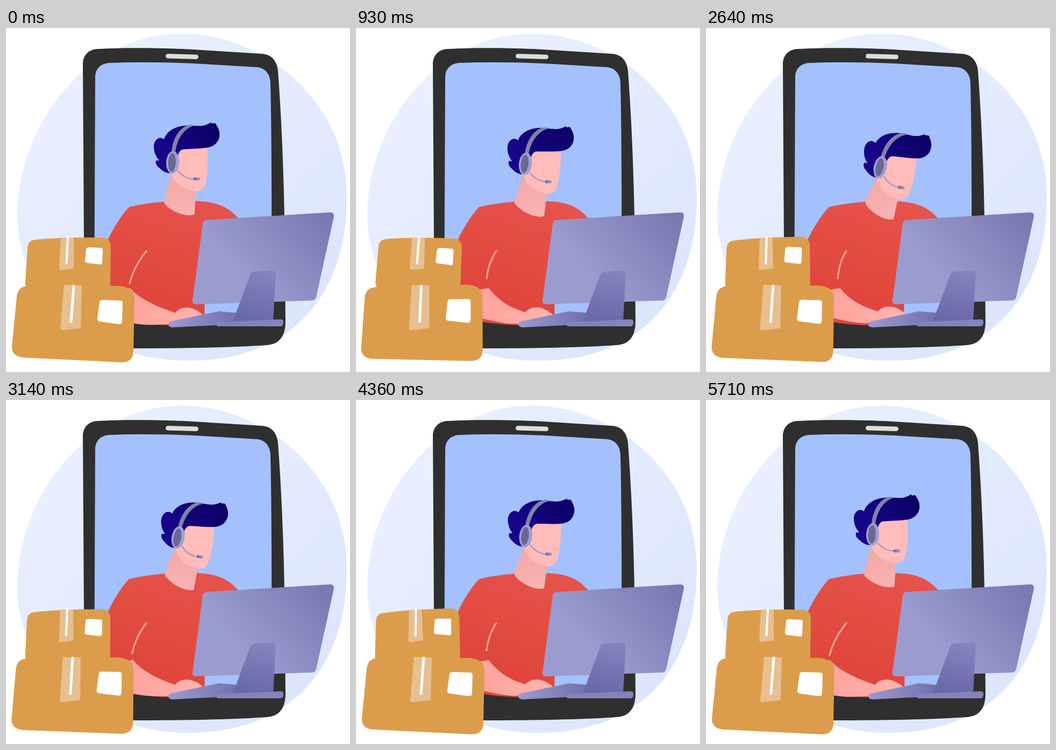
An HTML page for the animation above (5780 ms loop, 640 px wide and 640 px high).

```html
<!DOCTYPE html>
<html lang="en">
<head>
<meta charset="utf-8">
<title>Parcel support</title>
<style>
  html, body { margin: 0; width: 100%; height: 100%; overflow: hidden; background: #fff; }
  svg { display: block; width: 100%; height: 100%; }
</style>
</head>
<body>
<svg viewBox="0 0 640 640">
  <defs>
    <linearGradient id="sky" x1="0.2" y1="0.2" x2="0.9" y2="0.9">
      <stop offset="0" stop-color="#e9effe"/><stop offset="1" stop-color="#dce5fb"/>
    </linearGradient>
    <linearGradient id="shirt" x1="0.7" y1="0" x2="0.4" y2="0.8">
      <stop offset="0" stop-color="#e5534b"/><stop offset="1" stop-color="#e0463b"/>
    </linearGradient>
    <linearGradient id="skin">
      <stop offset="0" stop-color="#ff9f98"/><stop offset="1" stop-color="#ffb5b1"/>
    </linearGradient>
    <linearGradient id="throat" x1="0.3" y1="0" x2="0.5" y2="1">
      <stop offset="0" stop-color="#f4a6a4"/><stop offset="1" stop-color="#f7b3b3"/>
    </linearGradient>
    <linearGradient id="hair" x1="0" y1="0.6" x2="1" y2="0.3">
      <stop offset="0" stop-color="#18068c"/><stop offset="1" stop-color="#0c0066"/>
    </linearGradient>
    <linearGradient id="panel" x1="0.3" y1="0.6" x2="1" y2="0.2">
      <stop offset="0" stop-color="#9c9bd0"/><stop offset="1" stop-color="#7a79b2"/>
    </linearGradient>
    <linearGradient id="stand" x1="0.6" y1="0" x2="0.4" y2="1">
      <stop offset="0" stop-color="#8583be"/><stop offset="1" stop-color="#6a67a8"/>
    </linearGradient>
    <linearGradient id="keys">
      <stop offset="0" stop-color="#9b9bd0"/><stop offset="1" stop-color="#7170ac"/>
    </linearGradient>
    <linearGradient id="mic">
      <stop offset="0" stop-color="#6c6b94"/><stop offset="1" stop-color="#a0a0d0"/>
    </linearGradient>
  </defs>

  <path fill="url(#sky)" d="M325 10.500C420 9 515 60 570 130C615 186 634 250 634 315C634 500 528 619 340 619C164 619 21 503 21 350C21 180 150 12 325 10.500Z"/>

  <!-- phone -->
  <path fill="#2f2f2f" d="M143 68C143 50 154 40 170 39C220 36 290 37 340 39.500L476 48C494 49 504 61 506 80Q515 200 518 350L520 546C520 574 508 589 484 590C430 594 340 596 236 596L150 590L145 400Z"/>
  <path fill="#a4c1fe" d="M166 92C166 76 176 66 192 65Q260 62 350 66L468 73C484 75 492 88 492 104Q495 220 494 546L164 546Z"/>
  <rect x="297" y="48.7" width="61" height="8.6" rx="4.3" fill="#dddddb" transform="rotate(1.6 327 53)"/>

  <!-- person -->
  <g id="body">
    <path fill="url(#shirt)" d="M229 333C255 327 275 325 295 323L352 322C390 323 413 331 434 356L440 380L371 400L369 552L305 553C280 552 250 550 225 545L180 543L178 420Q184 404 190 393C200 372 213 350 229 333Z"/>
  </g>
  <path id="crease" fill="none" stroke="#fca59c" stroke-width="3" stroke-linecap="round"/>
  <path id="neck" fill="url(#throat)" d="M309 268L294 321Q293 327 301 333C316 344 332 350 347 348Q351 348 351 344L354 290Z"/>
  <g id="head">
    <path fill="#ffbcba" d="M318 222L374 218C376 240 376 262 373 280C371 296 366 303 356 303C340 303 312 294 307 268Z"/>
    <path fill="url(#hair)" d="M294 207C298 193 313 184 330 182C350 179 362 187 379 177Q382 174 383 178Q390 175 391 180C398 189 400 202 393 212C386 222 374 223 362 224C348 225 336 225 328 226C321 229 320 236 318 246L312 269C300 272 292 267 285 260C279 256 277 249 280 246Q283 247 285 246C279 240 275 230 275 221C275 208 285 200 294 207Z"/>
    <path fill="#8182a9" d="M308 231C310 205 324 182 343 180Q348 180 349 182C332 187 318 205 315 232Z"/>
    <path fill="none" stroke="#9393c4" stroke-width="2" d="M319 265C326 274 337 281 350 281"/>
    <rect x="348.500" y="278" width="12.500" height="5.600" rx="2.500" fill="url(#mic)"/>
    <ellipse cx="310" cy="250" rx="12" ry="21" fill="#9f9fd0" transform="rotate(3 310 250)"/>
    <ellipse cx="308.800" cy="250" rx="7" ry="17" fill="#69688f" transform="rotate(3 309 250)"/>
  </g>
  <path id="arm" fill="url(#skin)"/>

  <!-- computer -->
  <path fill="url(#keys)" d="M306 546L396 527L430 530L430 551L309 557Q302 556 302 551Q302 547 306 546Z"/>
  <path fill="url(#panel)" d="M374 357L603 343Q611 343 610 351L577 501Q575 507 569 507L354 514Q346 514 347 507L366 364Q367 357 374 357Z"/>
  <path fill="url(#stand)" d="M463 453L496 451Q502 451 502 458L497 545L422 546L454 460Q456 454 463 453Z"/>
  <path fill="#8482bd" d="M395 547L510 542Q516 542 516 546L516 550Q515 555 510 555L394 555Q388 552 395 547Z"/>

  <!-- parcels -->
  <g id="upper">
    <path fill="#db9d4b" d="M40 409Q41 395 54 394Q100 389 180 390Q195 392 195 407L194 487L46 488Q35 486 36 472Z"/>
    <path fill="#e7bf90" d="M102 391L126 390L126 445Q126 448 123 448L102 450Q99 450 99 447Z"/>
    <path fill="none" stroke="#fff" stroke-width="4" d="M115 390L112.500 438" stroke-linecap="round"/>
    <path fill="#fff" d="M154 408L176 409Q180 409 180 413L179 436Q179 440 175 440L151 437Q146 436 147 432L149 412Q150 408 154 408Z"/>
  </g>
  <g id="lower">
    <path fill="#db9d4b" d="M20 500Q22 481 40 480L120 478L212 480Q240 483 239 505L237 602Q236 623 214 622L32 613Q10 611 11 592Z"/>
    <path fill="#e7bf90" d="M108 478L141 479L139 556Q138 559 135 559L105 562Q101 562 101 558Z"/>
    <path fill="none" stroke="#fff" stroke-width="5" d="M126 480L121 546" stroke-linecap="round"/>
    <path fill="#fff" d="M180 506L212 507Q217 507 217 512L216 546Q216 551 210 551L174 546Q169 545 170 540L174 510Q175 506 180 506Z"/>
  </g>
</svg>
<script>
  const LOOP = 5780, STEPS = 81, SPAN = 5710;

  // [time in ms, amount]
  const nod = [[0, 0], [640, 4], [930, 7], [1290, 4.5], [1710, 11.5], [1860, 13], [2640, 20],
    [3200, 14], [3640, 15.5], [4080, 4.5], [4360, 8], [5000, 9], [5710, 0]];
  const reach = [[0, 0], [640, 20], [930, 13], [1290, 0], [1710, 0.5], [1900, 0], [2430, 20],
    [2640, 15], [3070, 4], [3640, 20], [4070, 4], [4360, 13], [5140, 20], [5710, 0]];

  const part = id => document.getElementById(id);
  const [body, crease, neck, head, arm, upper, lower] =
    ['body', 'crease', 'neck', 'head', 'arm', 'upper', 'lower'].map(part);
  const move = (el, value) => el.setAttribute('transform', value);

  // Slope at a key: flat at turning points, otherwise the mean rise.
  function slope(keys, i) {
    const before = keys[i - 1], here = keys[i], after = keys[i + 1];
    if (!before || !after) return 0;
    if ((here[1] - before[1]) * (after[1] - here[1]) <= 0) return 0;
    return (after[1] - before[1]) / (after[0] - before[0]);
  }

  function sample(keys, t) {
    let i = 0;
    while (i < keys.length - 2 && t > keys[i + 1][0]) i++;
    const [t0, a] = keys[i], [t1, b] = keys[i + 1];
    const span = t1 - t0, u = (t - t0) / span, v = 1 - u;
    return a * v * v * (1 + 2 * u) + b * u * u * (3 - 2 * u)
      + span * u * v * (slope(keys, i) * v - slope(keys, i + 1) * u);
  }

  function drawArm(a, push) {
    const bend = Math.min(a / 13, 1);
    const hemX = 229 + 1.37 * a, hemY = 482 + 0.14 * a;
    const dx = 18 * push, dy = -6 * push;
    const low = 549 - 0.64 * a;
    const at = (x, y) => `${x + dx} ${y + dy}`;
    arm.setAttribute('d', `M200 ${487 + 0.1 * a}L231 ${484 + 0.2 * a}L${hemX} ${hemY}`
      + `C${hemX + 18} ${hemY + 22} ${at(282, 519)} ${at(315, 530 - bend)}`
      + `C${at(322, 520)} ${at(336, 517)} ${at(350, 523)}`
      + `Q${at(362, 528)} ${at(370, 537)}L370 548L303 ${551 - bend - 4 * push}`
      + `C285 ${552 - 6 * push} 258 ${low + 5} 235 ${low}L200 ${low - 10}Z`);
    crease.setAttribute('d', `M261 415Q${237 + 0.75 * a} ${445 - 0.75 * a} ${230 + a} ${475 - 9 * bend}`);
  }

  function draw(x) {
    const t = x * SPAN;
    const tilt = sample(nod, t) / 20, a = sample(reach, t);
    const push = Math.max(0, (a - 13) / 7);
    const turn = `rotate(${9.4 * tilt} 297 338)`;

    move(body, `rotate(${push} 229 333)`);
    move(neck, `translate(0 ${1.5 * push}) ${turn}`);
    move(head, `translate(0 ${5.4 * tilt + 1.5 * push}) ${turn}`);
    drawArm(a, push);

    // The upper parcel starts and ends upright and sways both ways between.
    const wave = -Math.cos(8 * Math.PI * x);
    const sway = x < 1 / 8 || x > 7 / 8 ? (1 + wave) / 2 : wave;
    move(upper, `rotate(${2.2 * sway} 115 488)`);
    move(lower, `rotate(${-1 - wave} 122 642)`);
  }

  const start = performance.now();
  function tick() {
    const t = (performance.now() - start) % LOOP;
    const step = Math.floor(t / LOOP * STEPS + 0.1);
    draw(Math.min(step / (STEPS - 1), 1));
    requestAnimationFrame(tick);
  }
  tick();
</script>
</body>
</html>
```
